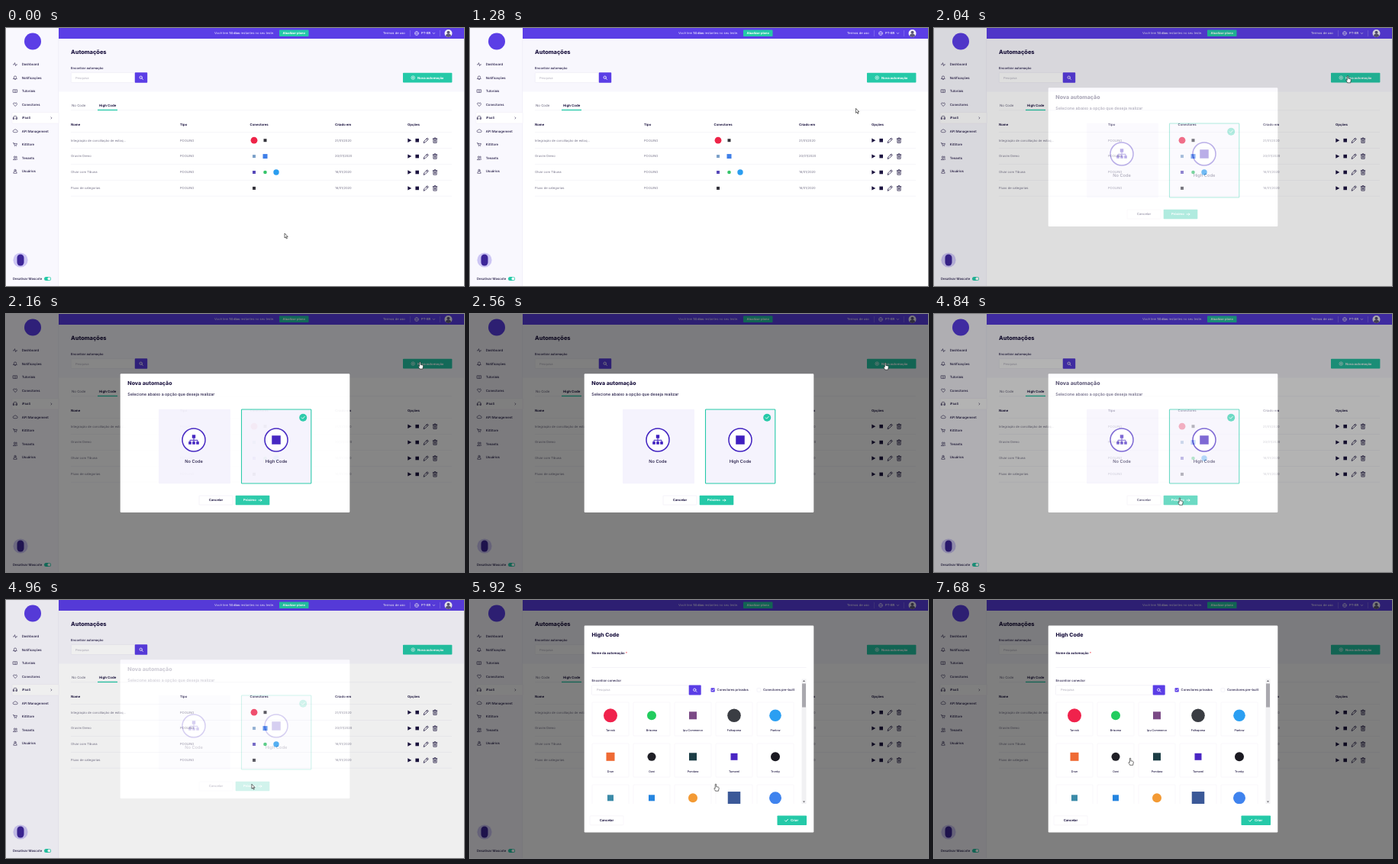
An HTML page for the animation above (8 s loop, 600 px wide and 338 px high).

```html
<!DOCTYPE html>
<html lang="pt-BR">
<head>
<meta charset="utf-8">
<title>Automações</title>
<style>
html, body { margin: 0; width: 100%; height: 100%; overflow: hidden; background: #fff; }
svg { display: block; width: 100vw; height: 100vh; }
text { font-family: Inter, "Open Sans", sans-serif; white-space: pre; text-rendering: geometricPrecision; }
.line { fill: none; stroke-linecap: round; stroke-linejoin: round; }
</style>
</head>
<body>
<svg id="stage" viewBox="0 0 600 338"></svg>
<script>
const INK = '#1c1440', GREY = '#77748a', PURPLE = '#5b3ee6', INDIGO = '#3f20c0', TEAL = '#25c9a8', EDGE = '#e9e7f0';

const rect = (x, y, w, h, fill, more = '') =>
  `<rect x="${x}" y="${y}" width="${w}" height="${h}" fill="${fill}" ${more}/>`;
const dot = (x, y, r, fill, more = '') => `<circle cx="${x}" cy="${y}" r="${r}" fill="${fill}" ${more}/>`;
const text = (x, y, size, str, fill = INK, weight = 500, anchor = 'start') =>
  `<text x="${x}" y="${y}" font-size="${size}" fill="${fill}" font-weight="${weight}" text-anchor="${anchor}">${str}</text>`;
const line = (d, color = INK, w = .7, x = 0, y = 0) =>
  `<path class="line" d="${d}" stroke="${color}" stroke-width="${w}" transform="translate(${x} ${y})"/>`;
const box = (x, y, w, h, fill = '#fff', stroke = EDGE, sw = .5) =>
  rect(x, y, w, h, fill, `rx=".8" stroke="${stroke}" stroke-width="${sw}"`);
const square = (x, y, s, fill) => rect(x - s / 2, y - s / 2, s, s, fill);
const lens = (x, y) => line('M1.1 1.1L2.4 2.4M1.4 -.3a1.7 1.7 0 1 1 -3.4 0a1.7 1.7 0 1 1 3.4 0', '#fff', .8, x, y);
const tick = (x, y, k = 1) => line(`M${-2 * k} 0L${-.6 * k} ${1.4 * k}L${2 * k} ${-1.4 * k}`, '#fff', .9, x, y);

// Sidebar entries: label and icon path centred on 0,0
const menu = [
  ['Dashboard', 'M-2.6 .3H-1.4L-.5 -2L.6 2L1.4 .3H2.6'],
  ['Notificações', 'M-2.3 1.4H2.3L1.6 .4V-.6a1.6 1.6 0 0 0 -3.2 0V.4ZM-.5 2.4H.5'],
  ['Tutoriais', 'M-2.5 -1.8H-.4L0 -1.4L.4 -1.8H2.5V1.7H-2.5ZM0 -1.4V1.7'],
  ['Conectores', 'M0 2.2L-2.3 -.1C-3 -2.2 -.8 -2.8 0 -1.1C.8 -2.8 3 -2.2 2.3 -.1Z'],
  ['iPaaS', 'M-2.3 1.2V-.3a2.3 2.1 0 0 1 4.6 0V1.2M-2.3 .1H-1.3V2H-2.3ZM1.3 .1H2.3V2H1.3Z'],
  ['API Management', 'M-1.5 1.6a1.4 1.4 0 0 1 0 -2.8a1.8 1.8 0 0 1 3.3 0a1.4 1.4 0 0 1 0 2.8Z'],
  ['KitStore', 'M-2.7 -2H-1.8L-1 1H1.8L2.4 -1.2H-1.5M-.6 2.2V2.3M1.4 2.2V2.3'],
  ['Tenants', 'M-2.4 2.2a2 2.2 0 0 1 3.6 0ZM.5 -1a1.1 1.1 0 1 1 -2.2 0a1.1 1.1 0 1 1 2.2 0M1.4 -2a1 1 0 0 1 0 2M2 .7L2.6 2.2'],
  ['Usuários', 'M-2.2 2.3a2.2 2.5 0 0 1 4.4 0ZM1.2 -1.2a1.2 1.2 0 1 1 -2.4 0a1.2 1.2 0 1 1 2.4 0'],
];

function sidebar() {
  let s = rect(0, 0, 69, 338, '#f9f8fe') + rect(68.6, 14, .5, 324, '#e9e7f4') + dot(35, 17.5, 11, PURPLE);
  s += box(8, 110.5, 61, 14.5, '#fff', '#eceaf4');
  menu.forEach(([label, icon], i) => {
    const y = 47.6 + i * 17.5;
    s += line(icon, INK, .55, 12, y) + text(20.7, y + 1.5, 4.3, label);
  });
  s += line('M-.5 -1L.5 0L-.5 1', INK, .6, 59.5, 117.8);
  s += dot(19, 304, 9.6, '#cdc6f4') + rect(14.5, 296.5, 9, 15, '#3d2699', 'rx="4.5"');
  return s + text(9, 330.2, 4.3, 'Desativar Mascote') + rect(50, 325.9, 9, 5, TEAL, 'rx="2.5"') + dot(56.4, 328.4, 1.9, '#fff');
}

function topbar() {
  return rect(69, 0, 531, 14, PURPLE)
    + text(273, 8.4, 4.1, 'Você tem <tspan font-weight="700">14 dias</tspan> restantes no seu teste.', '#e9e5ff', 400)
    + rect(358, 2.6, 38.5, 8.4, TEAL, 'rx=".8"') + text(377.2, 8.3, 4, 'Atualizar plano', '#fff', 700, 'middle')
    + text(494, 8.4, 4.1, 'Termos de uso', '#fff', 400)
    + rect(529, 3, .4, 8, '#a898f4') + rect(568, 3, .4, 8, '#a898f4')
    + line('M2.6 0a2.6 2.6 0 1 1 -5.2 0a2.6 2.6 0 1 1 5.2 0M-2.6 0H2.6M0 -2.6C-1.8 -1 -1.8 1 0 2.6C1.8 1 1.8 -1 0 -2.6', '#fff', .4, 538, 7)
    + text(544, 8.4, 4.1, 'PT-BR', '#fff') + line('M-1.2 -.6L0 .6L1.2 -.6', '#fff', .6, 560.5, 7)
    + dot(579.5, 7, 5, '#f3f1fa') + dot(579.5, 5.8, 2, '#5d5878')
    + `<path d="M576 10.5a3.5 3 0 0 1 7 0a5 5 0 0 1 -7 0" fill="#5d5878"/>`;
}

// Table rows: name, day, connector marks [shape, offset, size, colour]
const rows = [
  ['Integração de conciliação de estoq...', 21, [[dot, 325, 4.4, '#ee2448'], [square, 339.5, 4, '#33323a']]],
  ['Gruvim Demo', 20, [[square, 325, 4, '#7ba0c8'], [square, 339.5, 6, '#3f7fe8']]],
  ['Olvar com Tibuna', 16, [[square, 325, 4, '#5648b8'], [dot, 339.5, 2.3, '#35c46a'], [dot, 354, 3.7, '#2a9df0']]],
  ['Fluxo de categorias', 16, [[square, 325, 4, '#33323a']]],
];

function page() {
  let s = rect(0, 0, 600, 338, '#fff') + rect(69, 13, 531, 70.5, '#f8f7fd') + sidebar() + topbar();
  s += text(85, 34.4, 7.4, 'Automações', INK, 800) + text(85, 54, 4.15, 'Encontrar automação');
  s += box(85.3, 58.5, 83.5, 13, '#fff') + text(91, 66.6, 4.1, 'Pesquisa', '#b3b0be', 400);
  s += rect(168.8, 58.3, 16.4, 13.4, PURPLE, 'rx=".8"') + lens(177, 65);
  s += rect(520, 58.7, 64.4, 12.8, TEAL, 'rx=".8"') + dot(533.2, 65.1, 2.3, 'none', 'stroke="#fff" stroke-width=".6"');
  s += line('M-1 0H1M0 -1V1', '#fff', .6, 533.2, 65.1) + text(539, 66.7, 4.2, 'Nova automação', '#fff', 700);
  s += text(86, 103, 4.4, 'No Code', GREY) + text(122, 103, 4.4, 'High Code', INK, 700);
  s += rect(85, 107.7, 499, .4, EDGE) + rect(120, 106.8, 26, 1.3, TEAL);
  [[85, 'Nome'], [228, 'Tipo'], [319.5, 'Conectores'], [431, 'Criado em'], [526, 'Opções']]
    .forEach(([x, label]) => s += text(x, 127.8, 4.25, label, INK, 700));
  s += rect(85, 136.3, 499, .4, EDGE);
  rows.forEach(([name, day, marks], i) => {
    const y = 147.2 + i * 20.9;
    s += text(85, y + 1.3, 4.15, name, GREY, 400) + text(228, y + 1.3, 4.1, 'POOLING', GREY, 400)
      + text(431, y + 1.3, 4.1, day + '/01/2020', GREY, 400);
    marks.forEach(([shape, x, size, color]) => s += shape(x, y, size, color));
    s += `<path d="M526.3 ${y - 2.7}l5 2.7l-5 2.7Z" fill="${INK}"/>` + square(538.7, y, 4.6, INK);
    s += line('M-3 3L-2.4 .9L1.7 -3.2L3.2 -1.7L-.9 2.4ZM.6 -2.1L2.1 -.6', INK, .75, 550.2, y);
    s += line('M-2.8 -2.1H2.8M-2.1 -2.1V3.2H2.1V-2.1M-1 -2.1V-3.2H1V-2.1M-.7 -.5V1.7M.7 -.5V1.7', INK, .75, 562, y);
    s += rect(85, y + 10, 499, .4, EDGE);
  });
  return s;
}

// The shade comes first so that the fade can reach it as firstChild
const dialog = (y, h, body) =>
  rect(0, 0, 600, 338, '#000') + rect(149.7, y, 300.6, h, '#fff', 'rx="1.2"') + body;

function choice() {
  let s = text(159.3, 93.4, 7, 'Nova automação', INK, 800)
    + text(159.3, 106.8, 5.3, 'Selecione abaixo a opção que deseja realizar');
  s += rect(200, 124.7, 94, 97.5, '#f5f3fd', 'rx="1"') + box(308.5, 125, 91.3, 97, '#f5f3fd', TEAL, 1.1);
  s += dot(389.2, 135.8, 5, TEAL) + tick(389.2, 135.8);
  [246, 354].forEach(x => s += dot(x, 165, 15, '#fff', `stroke="${INDIGO}" stroke-width="1.5"`));
  s += line('M0 -3.5V3.5M-5 3.5V.3H5V3.5', INDIGO, 1, 246, 165) + square(246, 160.5, 4.4, INDIGO);
  [241, 246, 251].forEach(x => s += square(x, 169, 3.6, INDIGO));
  s += square(354, 165, 11.5, INDIGO);
  s += text(246, 194.8, 5.7, 'No Code', INK, 500, 'middle') + text(354, 194.8, 5.7, 'High Code', INK, 500, 'middle');
  s += box(253, 238, 44, 12) + text(275, 245.4, 4.2, 'Cancelar', INK, 700, 'middle');
  s += rect(300.7, 237.8, 44.6, 12.4, TEAL, 'rx=".8"') + text(311, 245.4, 4.2, 'Próximo', '#fff', 700);
  return dialog(78.2, 181.8, s + line('M-2 0H2M.7 -1.2L2 0L.7 1.2', '#fff', .8, 333, 244));
}

const connectors = [
  ['Tarvok', '#f0224c', dot, 9], ['Brisoma', '#22cc5e', dot, 6], ['Ipu Commerce', '#7b4a86', square, 10],
  ['Folhapena', '#3a3d43', dot, 8.8], ['Piarlow', '#2b9ff2', dot, 7.8],
  ['Drun', '#ef6a34', square, 11], ['Ozei', '#1f1f26', dot, 5.5], ['Pondara', '#1c3d45', square, 10],
  ['Tumarel', '#4a26c4', square, 9], ['Tronky', '#1b1a22', dot, 6],
  ['', '#3b8ba8', square, 8], ['', '#2585e0', square, 8], ['', '#f39a34', dot, 6],
  ['', '#3b5998', square, 16.5], ['', '#3f83ee', dot, 8],
];

function picker() {
  let s = text(159.6, 48.4, 7, 'High Code', INK, 800)
    + text(159.6, 71, 4.3, 'Nome da automação <tspan fill="#f03a4a">*</tspan>', INK, 700)
    + rect(159.5, 88, 281, .5, EDGE) + text(159.6, 106.8, 4.2, 'Encontrar conector');
  s += box(159.5, 111.8, 128, 12.4) + text(166, 119.4, 4.1, 'Pesquisa', '#b3b0be', 400);
  s += rect(286.7, 111.6, 16, 12.8, PURPLE, 'rx=".8"') + lens(294.6, 118);
  s += rect(315.5, 115.3, 5.2, 5.2, PURPLE, 'rx=".8"') + tick(318.1, 117.9, .75) + text(323.6, 119.4, 4.15, 'Conectores privados');
  s += box(376, 115.5, 4.8, 4.8) + text(384, 119.4, 4.15, 'Conectores pre-built');
  let cards = '';
  connectors.forEach(([label, color, shape, size], i) => {
    const x = 184 + i % 5 * 54, y = 151.3 + Math.floor(i / 5) * 54;
    cards += box(x - 24, y - 17.3, 48, 44, '#fff', '#f1eff5') + shape(x, y, size, color)
      + text(x, y + 20.4, 3.7, label, INK, 500, 'middle');
  });
  s += `<clipPath id="view"><rect x="155" y="130" width="278" height="137"/></clipPath><g clip-path="url(#view)">${cards}</g>`;
  s += rect(434.5, 103.5, 6, 163.5, '#f1f1f3') + rect(435, 109.5, 5, 31, '#a9a8ae');
  s += '<path d="M436 107l1.5 -2l1.5 2ZM436 263.5l1.5 2l1.5 -2Z" fill="#66656c"/>';
  s += text(179, 290.2, 4.2, 'Cancelar', INK, 700, 'middle') + box(157, 282.8, 44, 12, 'none', '#f0eff5');
  s += rect(402.5, 282.5, 38.5, 12.6, TEAL, 'rx=".8"') + tick(414.5, 288.8) + text(420, 290.2, 4.2, 'Criar', '#fff', 700);
  return dialog(33.6, 270.9, s);
}

const pointers = `<g id="cursor" stroke="#111" stroke-width=".6" stroke-linejoin="round" fill="#fff">
<path id="arrow" d="M0 0V6L1.4 4.8L2.4 7L3.4 6.6L2.4 4.4H4.2Z"/>
<path id="hand" d="M-.7 .6a.75 .75 0 0 1 1.5 0V3.4L3.6 4Q4.4 4.3 4.3 5.4L3.6 9H-.4Q-1.3 7 -2.1 5.9Q-1.9 4.7 -.7 5.6Z"/></g>`;

const $ = id => document.getElementById(id);
$('stage').innerHTML = page() + `<g id="choice">${choice()}</g><g id="picker">${picker()}</g>` + pointers;

const clamp = v => Math.min(1, Math.max(0, v));
const ramp = (t, a, b) => clamp((t - a) / (b - a));
const ease = p => p * p * (3 - 2 * p);

// Pointer tip: time, x, y
const path = [[0, 365, 269], [460, 365, 269], [1620, 542, 62.8], [2050, 542, 62.8], [2500, 544, 64],
  [2820, 544, 64], [4420, 321.9, 241.2], [6980, 321.9, 241.2], [7680, 257, 207.3], [8000, 257, 207.3]];
const handSpans = [[1480, 2960], [3780, 4085], [4290, 4900], [5280, 8000]];

// The shade lags a little behind its panel
function fade(id, p) {
  const group = $(id);
  group.setAttribute('opacity', p);
  group.firstChild.setAttribute('opacity', .5 * p ** .3);
  group.style.display = p > 0 ? '' : 'none';
}

function draw(now) {
  const t = now % 8000;
  fade('choice', ramp(t, 1970, 2170) * (1 - ramp(t, 4755, 5015)));
  fade('picker', ramp(t, 5180, 5400));
  const i = path.findIndex((k, n) => n && t < k[0]);
  const [t0, x0, y0] = path[i - 1], [t1, x1, y1] = path[i], p = ease(ramp(t, t0, t1));
  $('cursor').setAttribute('transform', `translate(${x0 + (x1 - x0) * p} ${y0 + (y1 - y0) * p})`);
  const hand = handSpans.some(([a, b]) => t >= a && t < b);
  $('hand').style.display = hand ? '' : 'none';
  $('arrow').style.display = hand ? 'none' : '';
}

const start = performance.now();
function loop() {
  draw(performance.now() - start);
  requestAnimationFrame(loop);
}
loop();
</script>
</body>
</html>
```
